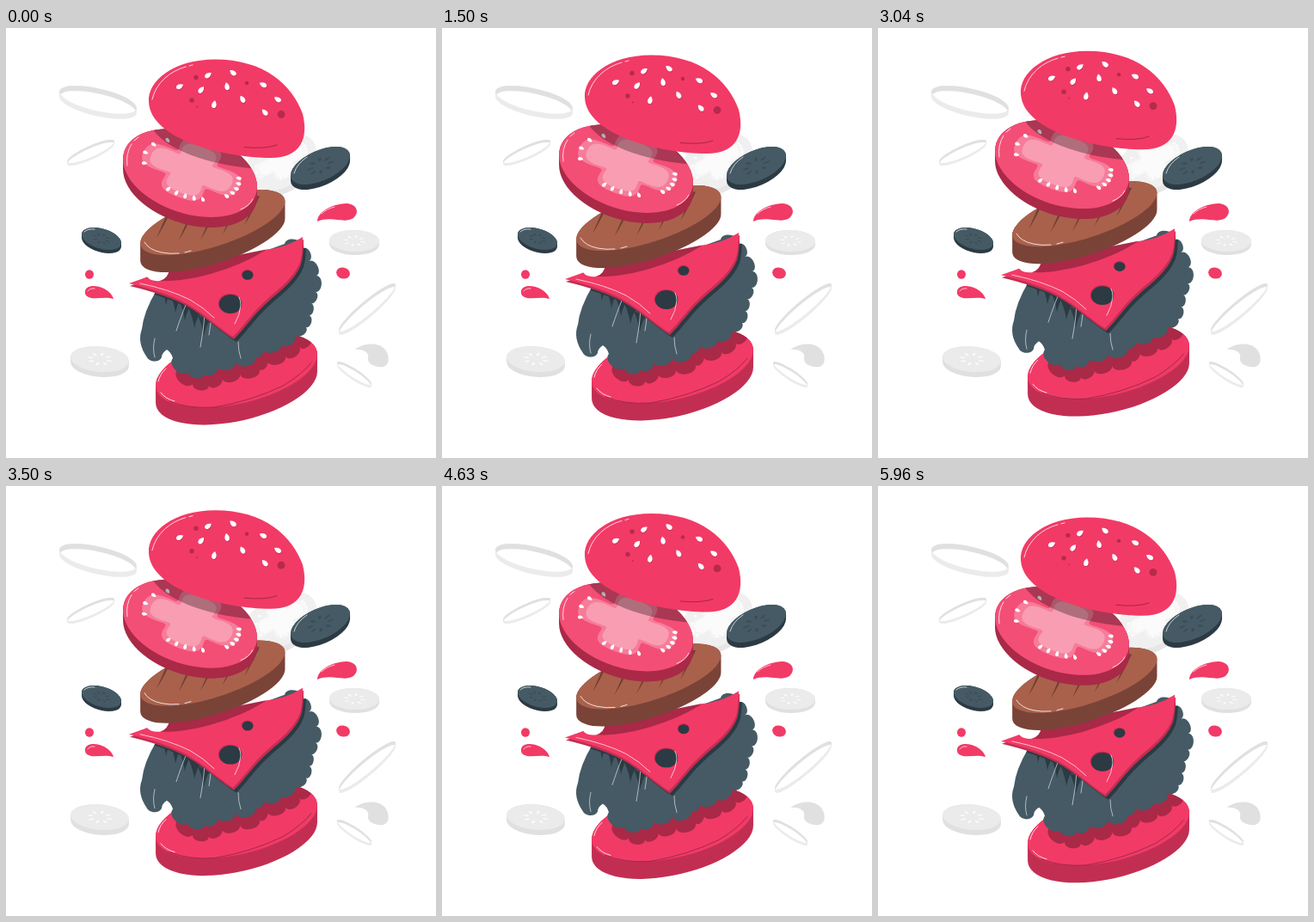
An HTML page with a canvas that plays this animation: 500 by 500 pixels, repeating every 6000 ms.

```html
<!DOCTYPE html>
<html lang="en">
<head>
<meta charset="utf-8">
<title>Floating burger</title>
<style>
html, body { margin: 0; width: 100%; height: 100%; overflow: hidden; background: #fff; }
canvas { display: block; width: 500px; height: 500px; }
</style>
</head>
<body>
<canvas id="stage"></canvas>
<script>
const LOOP = 6000, LIFT = 10, SIZE = 500;
const PINK = '#f23a66', DEEP = '#c22e52', SLATE = '#455a64', DARK = '#2b3a43';
const SHADE = 'rgba(0,0,0,.3)';
const canvas = document.getElementById('stage');
const ctx = canvas.getContext('2d');
const ratio = window.devicePixelRatio || 1;
canvas.width = canvas.height = SIZE * ratio;

const rad = deg => deg * Math.PI / 180;
const shape = d => new Path2D(d);

function fill(path, color, dx = 0, dy = 0) {
  ctx.save();
  ctx.translate(dx, dy);
  ctx.fillStyle = color;
  ctx.fill(path);
  ctx.restore();
}

function inside(path, paint) {
  ctx.save();
  ctx.clip(path);
  paint();
  ctx.restore();
}

// Paint in unit coordinates of a tilted ellipse
function tilted(x, y, deg, rx, ry, paint) {
  ctx.save();
  ctx.translate(x, y);
  ctx.rotate(rad(deg));
  ctx.scale(rx, ry);
  paint();
  ctx.restore();
}

function line(d, color = '#fff', width = 0.8) {
  ctx.strokeStyle = color;
  ctx.lineWidth = width;
  ctx.lineCap = ctx.lineJoin = 'round';
  ctx.stroke(shape(d));
}

// Ellipse swept straight down by depth
function disc(x, y, rx, ry, deg = 0, depth = 0) {
  const a = rad(deg), p = new Path2D();
  const right = Math.atan2(-ry * Math.sin(a), rx * Math.cos(a));
  p.ellipse(x, y + depth, rx, ry, a, right, right + Math.PI);
  p.ellipse(x, y, rx, ry, a, right + Math.PI, right + 2 * Math.PI);
  p.closePath();
  return p;
}

const oval = (color, ...args) => fill(disc(...args), color);

function slab(x, y, rx, ry, deg, depth, face, side) {
  oval(side, x, y, rx, ry, deg, depth);
  oval(face, x, y, rx, ry, deg);
}

function ring(x, y, rx, ry, deg, depth) {
  const rim = disc(x, y, rx, ry, deg);
  slab(x, y, rx, ry, deg, depth, '#e0e0e0', '#ebebeb');
  inside(rim, () => oval('#fff', x, y + depth, rx, ry, deg));
}

function cucumber(x, y, rx, ry, deg, depth, face, side, mark) {
  slab(x, y, rx, ry, deg, depth, face, side);
  tilted(x, y, deg, rx, ry, () => {
    for (let i = 0; i < 8; i++) {
      const a = rad(i * 45 + 11);
      oval(mark, Math.cos(a) * 0.34, Math.sin(a) * 0.4, 0.11, 0.05, i * 45 + 11);
    }
  });
}

const drop = shape('M5 0C2 -3 -1 -3.4 -3 -2.4C-5 -1.2 -5 1.2 -3 2.4C-1 3.4 2 3 5 0Z');

function seed(x, y, toX, toY, size, color = '#fff') {
  const deg = Math.atan2(toY - y, toX - x) * 180 / Math.PI;
  tilted(x, y, deg, size, size, () => fill(drop, color));
}

// Unit blob with four narrow notches
function clover(size, depth) {
  const p = new Path2D();
  for (let d = 0; d < 360; d += 3) {
    const r = size * (1 - depth * Math.pow(Math.cos(rad(2 * (d - 50))), 6));
    p.lineTo(r * Math.cos(rad(d)), r * Math.sin(rad(d)));
  }
  p.closePath();
  return p;
}

function tomato(x, y, rx, ry, deg, depth, colors) {
  const [side, face, flesh, core] = colors;
  slab(x, y, rx, ry, deg, depth, face, side);
  const cx = x + rx * 0.02, cy = y - ry * 0.08, a = rad(deg);
  tilted(cx, cy, deg, rx, ry, () => {
    fill(clover(0.74, 0.4), flesh);
    fill(clover(0.62, 0.42), core);
  });
  for (const [from, to, count] of [[66, 109, 5], [-14, 32, 5], [162, 230, 4]]) {
    for (let i = 0; i < count; i++) {
      const t = rad(from + (to - from) * i / (count - 1));
      const u = 0.71 * rx * Math.cos(t), v = 0.66 * ry * Math.sin(t);
      seed(cx + u * Math.cos(a) - v * Math.sin(a), cy + u * Math.sin(a) + v * Math.cos(a),
        cx, cy, rx * 0.0085);
    }
  }
}

// Closed outline with a bulge between each pair of cusps
function scallop(cusps) {
  let d = 'M' + cusps[0];
  for (let i = 1; i < cusps.length; i++) {
    const [x, y] = cusps[i - 1], [u, v] = cusps[i];
    const nx = (v - y) * 0.45, ny = (x - u) * 0.45;
    d += `C${x + nx} ${y + ny} ${u + nx} ${v + ny} ${u} ${v}`;
  }
  return d;
}

const frill = scallop([[324, 251], [346, 256], [352, 271], [361, 288], [360, 307], [354, 320],
  [352, 334], [349, 348], [336, 357], [320, 368], [298, 372], [290, 383], [267, 388],
  [246, 393], [231, 402], [212, 400], [194, 384]]);
const leaf = shape(frill + 'Q192 377 187 374Q181 378 181 383C178 390 166 388 164 383Q152 366 158 350Q160 330 175 305Z');
const sheet = shape('M143 297L164 289.5Q169 295 179 294Q189 291 190 280L300 258Q325 256 345 243Q345 262 342 272C335 290 320 301 304 315C286 331 277 346 264 359C246 348 232 333 209 320Q185 307 143 297Z');
const dome = shape('M166 86C164 62 195 36.6 243 36.6C300 36.6 333 66 345 100C352 128 343 151 308 151C255 151 168 130 166 86Z');
const bunTop = [268, 397.5, 96, 39.3, -13];
const pattyTop = [240.3, 226, 88, 28, -18];
const tomatoTop = [214, 168.5, 80.5, 47.4, 18];

function scenery() {
  tomato(319, 156, 45, 29, -30, 7, ['#e6e6e6', '#f0f0f0', '#f6f6f6', '#fbfbfb']);
  ring(107, 83.5, 46, 13, 13, 6);
  ring(98.5, 143.5, 30, 6.5, -24, 3);
  ring(420, 325, 42.6, 7.7, -40, 4);
  ring(405, 401.5, 23.6, 5, 33, 3);
  const pale = ['#ebebeb', '#e0e0e0', '#fafafa'], dark = [SLATE, DARK, '#3a4d57'];
  cucumber(405, 247.5, 29, 12.5, 1, 4, ...pale);
  cucumber(109, 385, 34, 14.7, 5, 6, ...pale);
  cucumber(111, 245, 23.7, 11.7, 16, 4, ...dark);
  cucumber(365.5, 160, 37, 17.6, -24, 6, ...dark);
  line('M91 237Q95 233 103 234M335 169Q338 158 350 150', '#fff', 0.7);
  fill(shape('M405 374C414 367 431 364 440 373C446 380 447 391 439 394C430 395 420 391 421 384C423 378 416 373 405 374Z'), '#e0e0e0');
  fill(shape('M362 225C362 215 376 205 396 204C409 205 411 215 404 221C393 228 379 218 362 225Z'), PINK);
  fill(shape('M92 308C91 299 104 298 114 303C121 307 124 311 125 315C116 312 108 315 99 314C95 313 92 311 92 308Z'), PINK);
  oval(PINK, 392, 285, 8, 6.5, 15);
  oval(PINK, 97, 286.5, 5, 5.2);
  line('M367 216Q373 210 382 208M95 306Q98 302 103 303', '#fff', 0.7);
}

function bottomBun() {
  slab(...bunTop, 20, PINK, DEEP);
  inside(disc(...bunTop), () => fill(shape(frill), SHADE, 5, 14));
  line('M190 434Q212 443 242 441Q285 434 322 416Q344 403 355 389', '#7d2340', 0.7);
  line('M177 411Q179 402 186 396M180 424Q185 431 196 434');
}

function lettuce() {
  fill(leaf, SLATE);
  inside(leaf, () => fill(sheet, DARK, 4, 6));
  for (let i = 0; i < 5; i++) {
    const x = 183 + i * 11, tip = 322 + i * 9;
    fill(shape(`M${x - 4} ${tip - 24}Q${x + 2} ${tip - 10} ${x + 3} ${tip}Q${x + 5} ${tip - 10} ${x + 10} ${tip - 18}Z`), DARK);
  }
  line('M209 322Q204 334 198 352M231 333Q230 350 226 371M238 343Q237 351 236 357M173 361Q170 373 173 383M270 365Q270 375 273 384', '#dfe5e8', 0.7);
}

function cheese() {
  fill(sheet, DEEP, 1, 3);
  fill(sheet, PINK);
  inside(sheet, () => fill(disc(...pattyTop, 30), SHADE));
  for (const [x, y, r] of [[261, 321, 13.8], [281, 287.3, 7]]) {
    oval(DEEP, x - 0.4, y - 0.7, r, r * 0.82);
    oval(DARK, x, y, r - 0.6, r * 0.79);
  }
  line('M156 297Q190 304 214 316Q230 325 242 337M266 344Q272 334 273 322Q273 317 271 313', '#fff', 0.7);
}

function patty() {
  slab(...pattyTop, 20, '#a9614c', '#7a4338');
  for (let i = 0; i < 5; i++) {
    const x = 175 + 25.5 * i, y = 244 + 6 * i - 2.4 * i * i;
    fill(shape(`M${x + 15} ${y - 34}h3Q${x + 9} ${y - 14} ${x} ${y}Z`), '#703d33');
  }
  line('M161 249Q166 258 181 261Q191 263 201 262M208 261L215 259');
}

function redTomato() {
  tomato(...tomatoTop, 12, ['#a92947', '#f34e76', '#f67c9a', '#f99db2']);
  line('M141 160Q139 146 146 135M149 131L154 127M273 211Q283 207 287 199');
  inside(disc(...tomatoTop, 12), () => fill(dome, SHADE, -2, 13));
}

function topBun() {
  fill(dome, PINK);
  for (const [x, y, r] of [[221, 57.5, 2.7], [280, 64, 2.2], [216, 84, 2.7], [320, 100.5, 4.4], [222, 91.5, 0.9]]) {
    oval('#b52a4d', x, y, r, r);
  }
  const seeds = [[202, 68], [235, 55], [264, 52], [227, 72], [257, 68],
    [299, 66], [316, 83], [275, 83], [242, 89], [301, 98]];
  for (const [x, y] of seeds) {
    seed(x + 0.4, y + 0.8, 252, 42, 0.95, DEEP);
    seed(x, y, 252, 42, 0.95);
  }
  line('M170 83Q173 69 185 58Q195 49 209 45M213 44L217 43');
  line('M277 138.5Q302 141 315 136', '#8f2444');
}

const burger = [bottomBun, lettuce, cheese, patty, redTomato, topBun];

function draw(now) {
  const t = now % LOOP / LOOP;
  const rise = LIFT * (1 - Math.abs(1 - 2 * t));
  ctx.setTransform(ratio, 0, 0, ratio, 0, 0);
  ctx.fillStyle = '#fff';
  ctx.fillRect(0, 0, SIZE, SIZE);
  scenery();
  ctx.translate(0, -rise);
  for (const part of burger) part();
}

let start;
function tick(now) {
  if (start === undefined) start = now;
  draw(now - start);
  requestAnimationFrame(tick);
}
draw(0);
requestAnimationFrame(tick);
</script>
</body>
</html>
```
